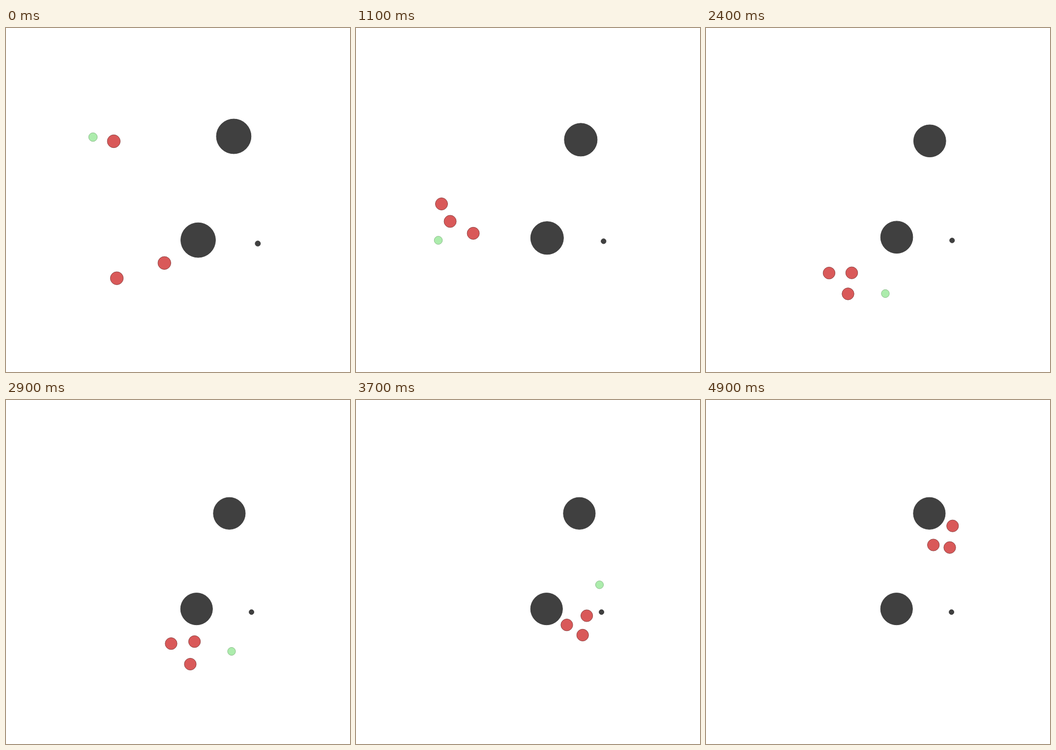
Animation of 700x700 px, one loop 5 s. Source, as an HTML page with a canvas:

```html
<!DOCTYPE html>
<html lang="en">
<head>
<meta charset="utf-8">
<title>Pursuit</title>
<style>
  html, body { margin: 0; width: 100%; height: 100%; overflow: hidden; background: #fff; }
  canvas { display: block; width: 700px; height: 700px; }
</style>
</head>
<body>
<canvas id="stage" width="700" height="700"></canvas>
<script>
const ctx = document.getElementById('stage').getContext('2d');
const LOOP = 5000, STEP = 100, CAUGHT = 4900, MID = 350;

// Obstacles at full scale: x, y, radius
const ROCKS = [[463.4, 220.5, 35.9], [391, 431.6, 35.9], [512.4, 438.6, 6]];

// Key poses of the chase; a smooth curve joins them
const TIMES = [0, 1100, 1900, 2900, 3700, 4400, 4900];
const PREY = [[177, 222], [167.5, 432], [261, 529], [459, 511.5], [495.5, 376], [517.5, 288], [502, 232]];
const HUNTERS = [
  [[219.3, 230.5], [174, 358], [180, 474.7], [336, 495.7], [429, 457.7], [461, 367], [462.7, 295]],
  [[322.3, 478.2], [238.6, 417.8], [221, 517], [375, 537.5], [461.2, 478.4], [491.5, 372.2], [496, 300.2]],
  [[225.5, 509.2], [191.6, 393.5], [219.5, 480.6], [383.6, 491.6], [469.6, 439], [490.2, 333], [501.8, 256.2]]
];

const clamp = x => Math.min(1, Math.max(0, x));
const progress = (t, from, to) => clamp((t - from) / (to - from));

// The view widens twice, when the chase nears its left and lower edges
const zoomAt = t => 1 - .053 * progress(t, 200, 800) - .026 * progress(t, 1900, 2600);

// Velocity at a key; every body starts from rest
function slope(keys, i, axis) {
  if (i === 0) return 0;
  const rate = j => (keys[j + 1][axis] - keys[j][axis]) / (TIMES[j + 1] - TIMES[j]);
  if (i === keys.length - 1) return rate(i - 1);
  const share = (TIMES[i] - TIMES[i - 1]) / (TIMES[i + 1] - TIMES[i - 1]);
  return rate(i - 1) * (1 - share) + rate(i) * share;
}

function pointAt(keys, t) {
  let i = 0;
  while (i < TIMES.length - 2 && t >= TIMES[i + 1]) i++;
  const d = TIMES[i + 1] - TIMES[i], u = clamp((t - TIMES[i]) / d), v = 1 - u;
  return [0, 1].map(k =>
    keys[i][k] * v * v * (1 + 2 * u) + keys[i + 1][k] * u * u * (3 - 2 * u) +
    d * u * v * (v * slope(keys, i, k) - u * slope(keys, i + 1, k)));
}

function disc(x, y, r, fill, edge = fill) {
  ctx.beginPath();
  ctx.arc(x, y, r - .5, 0, Math.PI * 2);
  ctx.fillStyle = fill;
  ctx.strokeStyle = edge;
  ctx.fill();
  ctx.stroke();
}

function draw(t) {
  const s = zoomAt(t);
  ctx.fillStyle = '#fff';
  ctx.fillRect(0, 0, 700, 700);
  for (const [x, y, r] of ROCKS) disc(MID + (x - MID) * s, MID + (y - MID) * s, r * s, '#404040');
  for (const keys of HUNTERS) disc(...pointAt(keys, t), 13.7 * s, '#d95959', '#8c4444');
  if (t < CAUGHT) disc(...pointAt(PREY, t), 9.3 * s, '#acecac', '#8abb8a');
}

const start = performance.now();
function tick() {
  const t = (performance.now() - start) % LOOP;
  draw(Math.floor(t / STEP) * STEP);
  requestAnimationFrame(tick);
}
tick();
</script>
</body>
</html>
```
